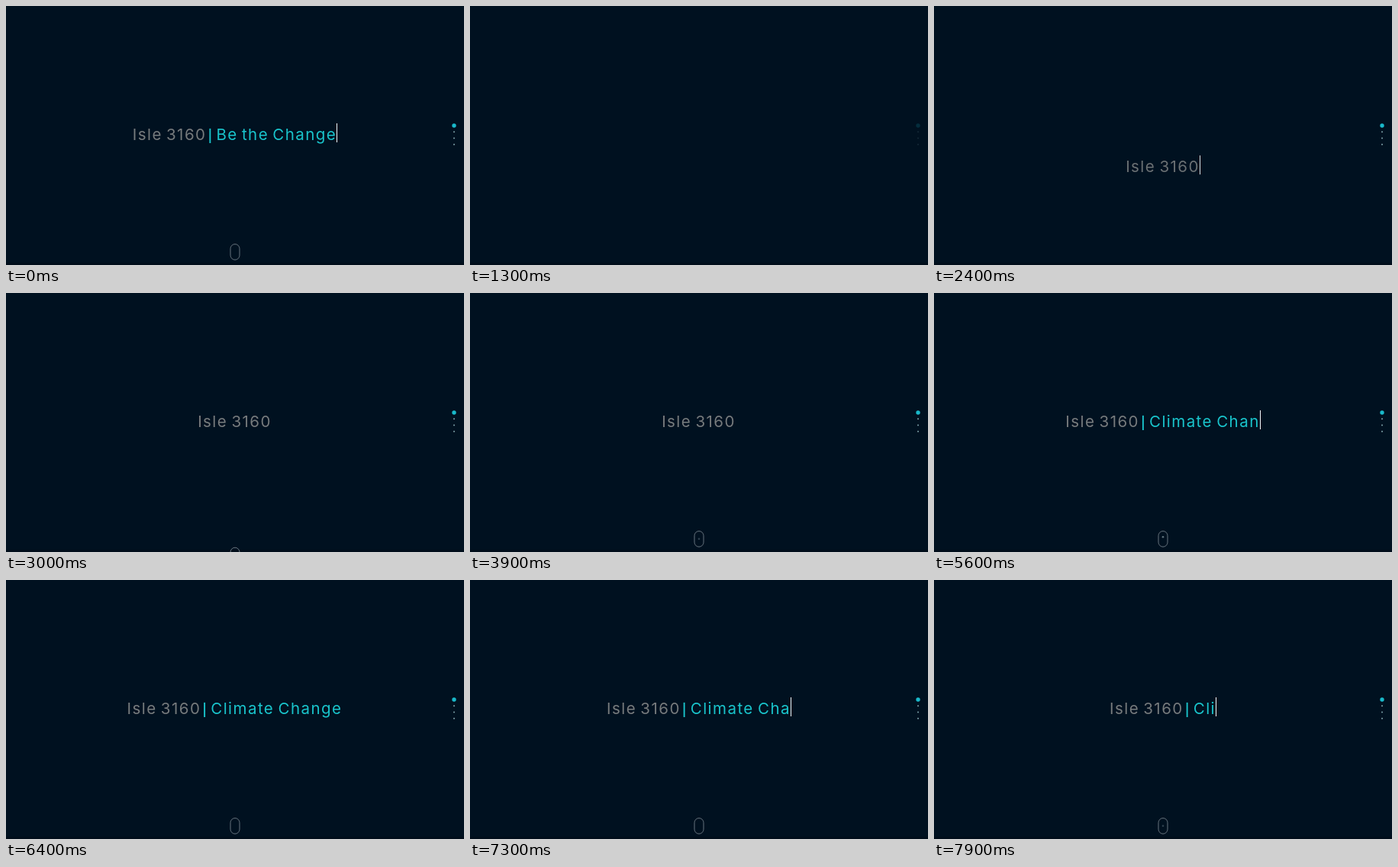
An HTML page for the animation above (8000 ms loop, 600x340 px).

```html
<!DOCTYPE html>
<html lang="en">
<head>
<meta charset="utf-8">
<title>Typed headline</title>
<style>
  html, body { margin: 0; width: 100%; height: 100%; overflow: hidden; background: #001120; }
  #stage { position: relative; width: 600px; height: 340px; overflow: hidden; }
  #line {
    position: absolute; left: 0; top: 154px; width: 600px; height: 25px;
    display: flex; justify-content: center; white-space: pre;
    font: 400 20.5px/25px Inter, sans-serif;
    letter-spacing: 1.45px; word-spacing: -2px; color: #777b7d;
  }
  #words { position: relative; top: 2px; }
  #tail { color: #19c5cc; }
  #bar { font-size: 16px; font-weight: 600; letter-spacing: 0; }
  #caret { width: 1px; height: 25px; background: #f4f8fa; }
  svg { position: absolute; left: 0; top: 0; }
</style>
</head>
<body>
<div id="stage">
  <div id="line"><span id="words">Isle 3160<span id="tail"><span id="bar"></span><span id="phrase"></span></span></span><span id="caret"></span></div>
  <svg width="600" height="340">
    <rect y="337" width="600" height="3" fill="#000d1a"/>
    <g id="mouse">
      <rect x="294" y="312.6" width="12" height="20.6" rx="6" fill="none" stroke="#68747e"/>
      <circle id="wheel" cx="300" r="1.3" fill="#62747e"/>
    </g>
    <g id="pager" fill="#7fa5ac">
      <circle cx="587" cy="157" r="2.7" fill="#19b9ca"/>
      <circle cx="587" cy="165.3" r="1"/>
      <circle cx="587" cy="173.5" r="1"/>
      <circle cx="587" cy="181.7" r="1"/>
    </g>
  </svg>
</div>
<script>
const LOOP = 8000, STEP = 100;
const RELOAD = 1200, TEXT_IN = 2150, MOUSE_IN = 2600;
const FIRST = " | Be the Change", SECOND = " | Climate Change";
const WHEEL_STARTS = [300, 3400, 5400, 7400];
const CARET_OFF = [[400, 900], [2800, 3300], [3800, 4000], [6400, 6900]];

const $ = id => document.getElementById(id);
const clamp = v => Math.max(0, Math.min(1, v));

function typedCount(t) {
  if (t < 4000) return 0;
  if (t < 4700) return Math.min(6, 1 + Math.floor((t - 4000) / 100));
  if (t < 5700) return Math.min(15, 7 + Math.floor((t - 4700) / 100));
  if (t < 5900) return 16;
  if (t < 7100) return 17;
  return 16 - Math.floor((t - 7100) / 80);
}

// Slide up by 100px while fading in
function reveal(t, start) {
  if (t < RELOAD) return { y: 0, opacity: 1 };
  const p = clamp((t - start) / 1000);
  return { y: 100 * (1 - p) ** 3, opacity: clamp(p * 3.6) };
}

function place(el, { y, opacity }) {
  el.style.transform = `translateY(${y}px)`;
  el.style.opacity = opacity;
}

function drawWheel(t) {
  const start = WHEEL_STARTS.find(s => t >= s && t < s + 800);
  const u = start === undefined ? 0 : t - start;
  $("wheel").setAttribute("cy", 320.3 + 3.2 * clamp((u - 200) / 400));
  $("wheel").style.opacity = u < 200 ? u / 200 : clamp((800 - u) / 600);
}

function render(t) {
  const text = t < RELOAD ? FIRST : SECOND.slice(0, typedCount(t));
  $("bar").textContent = text.slice(0, 2);
  $("phrase").textContent = text.slice(2);
  $("caret").style.opacity = CARET_OFF.some(([a, b]) => t >= a && t < b) ? 0 : 1;
  $("pager").style.opacity = t < RELOAD ? 1 : clamp((t - RELOAD) / 600);
  place($("line"), reveal(t, TEXT_IN));
  place($("mouse"), reveal(t, MOUSE_IN));
  drawWheel(t);
}

const begin = performance.now();
function tick() {
  const t = (performance.now() - begin) % LOOP;
  render(Math.floor(t / STEP) * STEP);
  requestAnimationFrame(tick);
}
tick();
</script>
</body>
</html>
```
